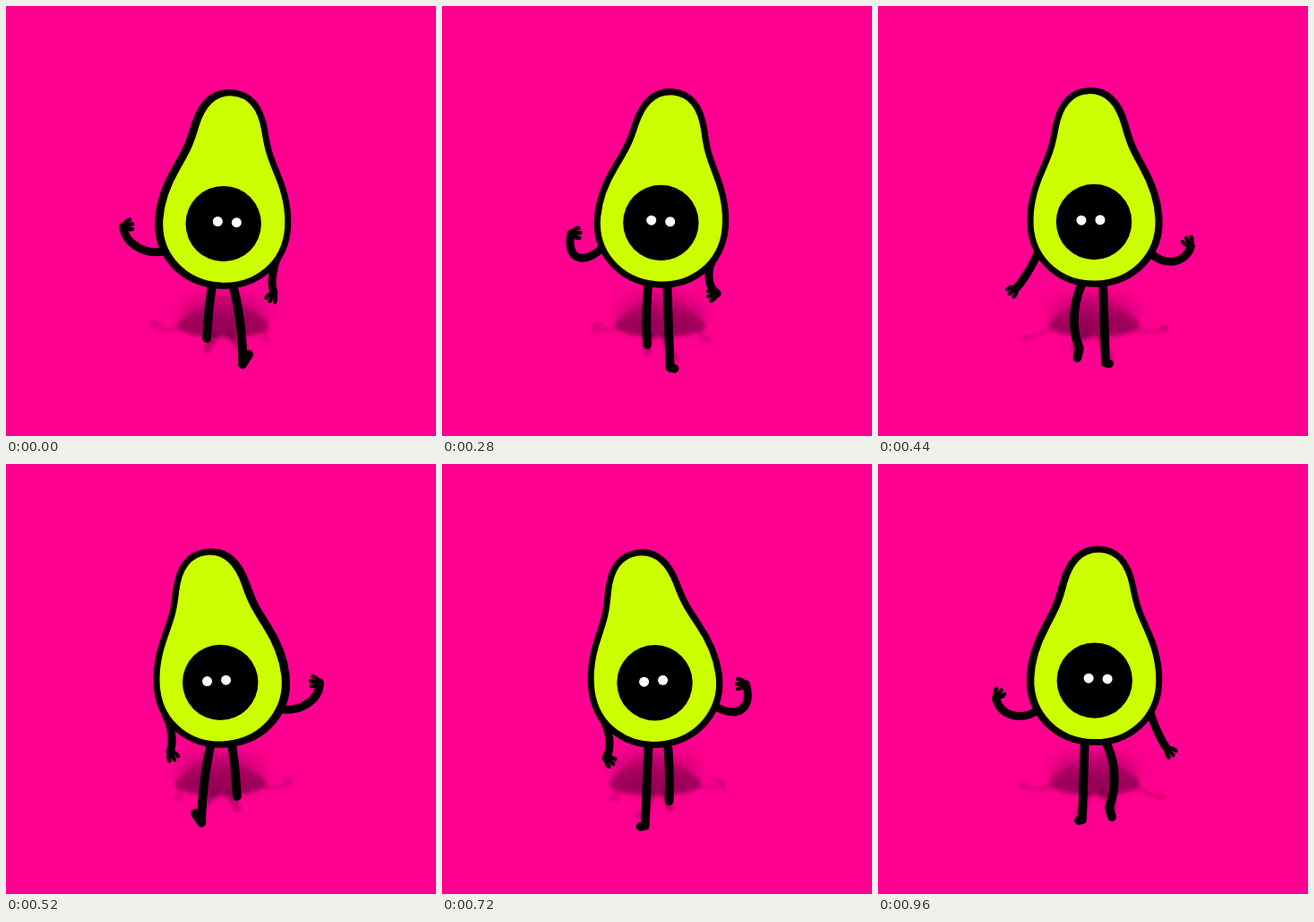
Recreate the animation shown at these times as an HTML page with a canvas. Size 480 by 480 pixels, loop 1000 ms.

```html
<!DOCTYPE html>
<html lang="en">
<head>
<meta charset="utf-8">
<title>Walking avocado</title>
<style>
  html, body { margin: 0; width: 100%; height: 100%; overflow: hidden; background: #ff0090; }
  canvas { display: block; width: 480px; height: 480px; }
</style>
</head>
<body>
<canvas id="stage" width="480" height="480"></canvas>
<script>
const ctx = document.getElementById('stage').getContext('2d');
const LOOP = 1000, STEP = 40, MIRROR = 482, TAU = Math.PI * 2;
const PINK = '#ff0090', LIME = '#ccff00', INK = '#000';

const rad = deg => deg * Math.PI / 180;
const mix = (a, b, u) => a + (b - a) * u;
// Cosine that peaks at the given time
const wave = (t, peak, period = LOOP) => Math.cos(TAU * (t - peak) / period);

// Smooth periodic curve through a few poses, without overshoot
function path(keys) {
  const n = keys.length;
  const at = (j, c) => {
    const turn = Math.floor(j / n);
    return keys[j - turn * n][c] + (c ? 0 : turn * LOOP);
  };
  const slope = (j, c) => (at(j + 1, c) - at(j, c)) / (at(j + 1, 0) - at(j, 0));
  const tangent = (j, c) => {
    const a = slope(j - 1, c), b = slope(j, c);
    return a * b > 0 ? 2 * a * b / (a + b) : 0;
  };
  return t => {
    let j = n - 1;
    while (keys[j][0] > t) j--;
    const span = at(j + 1, 0) - at(j, 0), u = (t - at(j, 0)) / span;
    return keys[0].slice(1).map((_, i) => {
      const c = i + 1;
      return mix(at(j, c), at(j + 1, c), u * u * (3 - 2 * u)) +
        span * u * (1 - u) * (tangent(j, c) * (1 - u) - tangent(j + 1, c) * u);
    });
  };
}

// time, wrist x, wrist y, elbow bend, finger direction
const armPath = path([
  [0,   131, 246, 16, -15],
  [120, 141, 239, 27, 5],
  [280, 144, 254, 27, -5],
  [450, 156, 316, 2, 140],
  [500, 183, 320, 5, 65],
  [720, 183, 328, 8, 40],
  [950, 132, 265, 18, -60]
]);
// time, heel x, heel y, knee bend, toe offset x, y
const legPath = path([
  [0,   224, 371, -1, 0, 0],
  [280, 229, 378, -2, 0, 0],
  [460, 224, 383, -12, -3, 11],
  [500, 218, 400, -5, -7, -11],
  [610, 222, 402, -1, -7, -3],
  [740, 227, 404, 0, -5, 1],
  [960, 228, 397, 0, -4, 1]
]);

function armPose(t) {
  const [x, y, bend, fingers] = armPath(t);
  const sx = 178, sy = 276 - 6 * wave(t, 180);
  const dx = x - sx, dy = y - sy, d = Math.hypot(dx, dy);
  const bow = u => [sx + dx * u + dy / d * bend, sy + dy * u - dx / d * bend];
  return { curve: [[sx, sy], bow(0.3), bow(0.8), [x, y]], fingers };
}

function legPose(t) {
  const [x, y, bend, tx, ty] = legPath(t);
  const hx = 231, hy = 304;
  const bow = u => [mix(hx, x, u) + bend, mix(hy, y, u)];
  return { curve: [[hx, hy], bow(0.3), bow(0.7), [x, y]], toe: [x + tx, y + ty] };
}

function bodyPose(t) {
  const tilt = 7.7 * wave(t, 160) - 0.6 * wave(t, 160, LOOP / 3);
  return {
    x: 241.2 + 3.8 * wave(t, 185),
    y: 243.1 + 3.1 * wave(t, 125, LOOP / 2),
    tilt: rad(tilt - 0.9),
    shell: -2.5 * wave(t, 55) ** 3,
    look: 4.2 * wave(t, 25),
    slope: tilt * 0.26
  };
}

// Right half of the pear around the seed, top to bottom
const half = [
  [0,-146.5], [22,-146.5], [33,-130], [38.5,-107], [44,-82], [48,-76], [56.5,-58],
  [66,-39], [71.5,-21], [71.5,0], [71.5,40], [40,69], [0,69]
];
const pear = [...half, ...half.slice(0, -1).reverse().map(([x, y]) => [-x, y])];

const flat = (x, y) => [x, y];
const ground = (x, y) => [
  240 + (x - 240) * (0.7 + (y - 246) * 0.0023),
  354 + (y - 246) * 0.24
];
const mirrored = map => (x, y) => map(MIRROR - x, y);

function trace(pts, map) {
  const p = pts.map(q => map(...q));
  ctx.beginPath();
  ctx.moveTo(...p[0]);
  for (let i = 1; i + 2 < p.length; i += 3) {
    ctx.bezierCurveTo(...p[i], ...p[i + 1], ...p[i + 2]);
  }
}

function drawLeg({ curve, toe }, map, width) {
  ctx.lineWidth = width;
  trace(curve, map);
  ctx.lineTo(...map(...toe));
  ctx.stroke();
}

function drawArm({ curve, fingers }, map, width) {
  ctx.lineWidth = width;
  trace(curve, map);
  ctx.stroke();
  const [x, y] = curve[3];
  const reach = (r, a) => map(x + r * Math.cos(a), y + r * Math.sin(a));
  ctx.lineWidth = width * 0.5;
  for (const i of [-1, 0, 1]) {
    const a = rad(fingers);
    ctx.beginPath();
    ctx.moveTo(...map(x, y));
    ctx.quadraticCurveTo(...reach(6, a + i), ...reach(10.5, a + i * 0.55));
    ctx.stroke();
  }
}

// Each limb's twin is its mirror image, half a loop later.
function drawPair(draw, pose, t, map, width) {
  draw(pose(t), map, width);
  draw(pose((t + LOOP / 2) % LOOP), mirrored(map), width);
}

function pearPath({ x, y, tilt }, map, shift) {
  const c = Math.cos(tilt), s = Math.sin(tilt);
  trace(pear, (px, py) => map(x + 0.5 + shift + px * c - py * s, y + px * s + py * c));
  ctx.closePath();
}

function disc(x, y, r, color) {
  ctx.fillStyle = color;
  ctx.beginPath();
  ctx.arc(x, y, r, 0, TAU);
  ctx.fill();
}

const shade = ctx.createLinearGradient(0, 315, 0, 392);
[[0, 0], [0.25, 0.13], [0.55, 0.4], [0.7, 0.4], [0.8, 0.33], [1, 0.25]]
  .forEach(([p, a]) => shade.addColorStop(p, `rgba(40,0,25,${a})`));

function drawShadow(b, t) {
  ctx.save();
  ctx.filter = 'blur(9px)';
  ctx.fillStyle = 'rgba(40,0,25,0.22)';
  ctx.beginPath();
  ctx.ellipse(b.x, 342, 50, 20, 0, 0, TAU);
  ctx.fill();
  ctx.filter = 'blur(2px)';
  ctx.fillStyle = ctx.strokeStyle = shade;
  pearPath(b, ground, 0);
  ctx.fill();
  drawPair(drawLeg, legPose, t, ground, 8);
  ctx.globalAlpha = 0.6;
  drawPair(drawArm, armPose, t, ground, 3);
  ctx.restore();
}

function drawBody(b) {
  ctx.lineWidth = 7;
  for (const [color, shift] of [[INK, b.shell], [LIME, 0]]) {
    ctx.fillStyle = color;
    pearPath(b, flat, shift);
    ctx.fill();
    ctx.stroke();
  }
  disc(b.x, b.y, 42.2, INK);
  for (const side of [-1, 1]) {
    disc(b.x + b.look + side * 10.5, b.y - 2 + side * b.slope / 2, 5.5, '#fff');
  }
}

function draw(t) {
  const b = bodyPose(t);
  ctx.fillStyle = PINK;
  ctx.fillRect(0, 0, 480, 480);
  ctx.lineCap = ctx.lineJoin = 'round';
  drawShadow(b, t);
  ctx.strokeStyle = INK;
  drawPair(drawLeg, legPose, t, flat, 9.8);
  drawPair(drawArm, armPose, t, flat, 9);
  drawBody(b);
}

const start = performance.now();
function tick() {
  const t = (performance.now() - start) % LOOP;
  draw(Math.floor(t / STEP) * STEP);
  requestAnimationFrame(tick);
}
tick();
</script>
</body>
</html>
```
